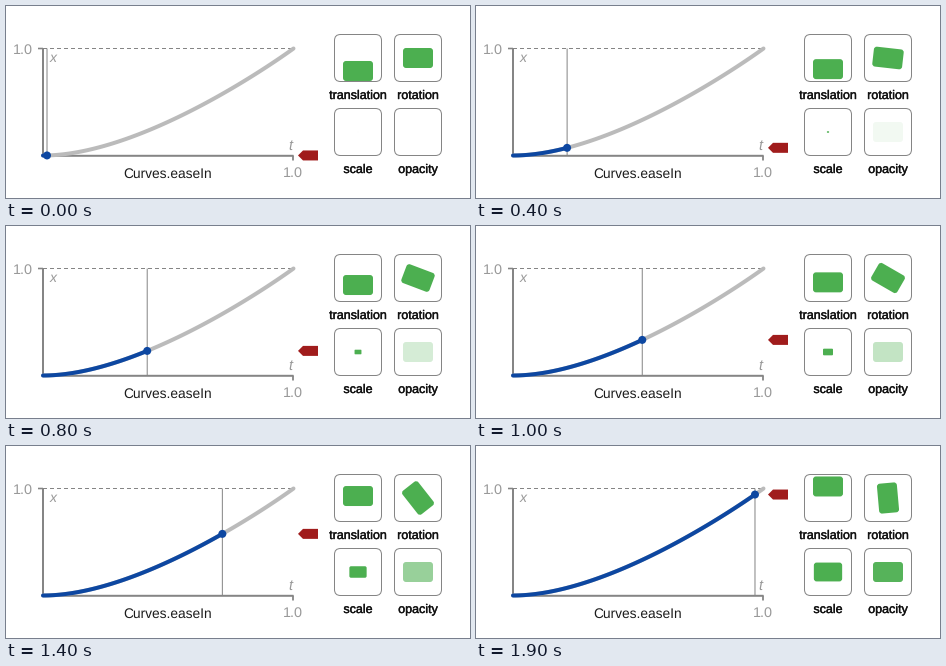
Recreate the animation shown at these times as a matplotlib script. Size 464 by 192 pixels, loop 2000 ms.

```python
import numpy as np
import matplotlib.pyplot as plt
from matplotlib.animation import FuncAnimation
from matplotlib.patches import Circle, FancyBboxPatch, Polygon
from matplotlib.patheffects import withStroke
from matplotlib.transforms import Affine2D

W, H, DPI = 464, 192, 64
PX = 72 / DPI  # points per pixel
FRAMES, INTERVAL = 20, 100

GREY, LABEL, TRACK = "#858585", "#999999", "#bbbbbb"
BLUE, GREEN, RED = "#0d47a1", "#4caf50", "#a01c1c"
X0, X1, Y0, Y1 = 37, 287.5, 149.5, 42.5

plt.rcParams["font.family"] = "Liberation Sans"
plt.rcParams["text.hinting"] = "none"

fig = plt.figure(figsize=(W / DPI, H / DPI), dpi=DPI, facecolor="white")
ax = fig.add_axes([0, 0, 1, 1])
ax.set_xlim(0, W)
ax.set_ylim(H, 0)
ax.axis("off")


def bezier(s):
    """Ease-in cubic with control points (0.42, 0) and (1, 1)."""
    y = 3 * (1 - s) * s**2 + s**3
    return 3 * 0.42 * (1 - s) ** 2 * s + y, y


def solve(t):
    lo, hi = 0.0, 1.0
    for _ in range(40):
        mid = (lo + hi) / 2
        if bezier(mid)[0] < t:
            lo = mid
        else:
            hi = mid
    return lo


def curve(end):
    x, y = bezier(np.linspace(0, end, 120))
    return X0 + (X1 - X0) * x, Y0 + (Y1 - Y0) * y


def line(x, y, color, width, **kw):
    kw.setdefault("solid_capstyle", "butt")
    return ax.plot(x, y, color=color, lw=width * PX, snap=False, **kw)[0]


def text(x, y, s, size, color, weight=0, **kw):
    label = ax.text(x, y, s, size=size * PX, color=color, ha="center",
                    va="baseline", **kw)
    if weight:
        label.set_path_effects(
            [withStroke(linewidth=weight * PX, foreground=color)])


def rounded(x, y, w, h, r, **kw):
    box = FancyBboxPatch((x, y), w, h, snap=False,
                         boxstyle=f"round,pad=0,rounding_size={r}", **kw)
    return ax.add_patch(box)


def block():
    return rounded(-15, -10, 30, 20, 3, fc=GREEN, ec="none", zorder=2)


def place(patch, x, y, angle=0, scale=1):
    move = Affine2D().scale(scale).rotate(angle).translate(x, y)
    patch.set_transform(move + ax.transData)


# Graph
line([X0, X1], [Y1, Y1], GREY, 1, dashes=(4, 3))
line([X0, X0], [Y1 - 0.5, Y0 + 1], GREY, 2)
line([X0 - 5, X0], [Y1, Y1], GREY, 1.6)
line([X0 - 1, X1], [Y0 + 0.3, Y0 + 0.3], GREY, 2)
line([X1 - 0.5] * 2, [Y0, Y0 + 5], GREY, 1.8)
line(*curve(1), TRACK, 4, solid_capstyle="round", zorder=3)
text(17, 48, "1.0", 14.4, LABEL)
text(287, 170.5, "1.0", 14.4, LABEL)
text(47, 55.5, "x", 14, LABEL, style="italic")
text(284.5, 144, "t", 14.5, LABEL, style="italic")
text(162, 172, "Curves.easeIn", 13.7, "#1c1c1c")

# Sample boxes
for x, y, name in [(352, 52, "translation"), (412, 52, "rotation"),
                   (352, 126, "scale"), (412, 126, "opacity")]:
    rounded(x - 23.5, y - 23.5, 47, 47, 6, fc="none", ec=GREY, lw=PX,
            zorder=3)
    text(x, y + 41, name, 12.5, "#111111", weight=0.4)

# Moving parts
guide = line([], [], GREY, 1, zorder=2)
trail = line([], [], BLUE, 4, solid_capstyle="round", zorder=4)
dot = ax.add_patch(Circle((0, 0), 4, fc=BLUE, ec="none", zorder=5))
marker = ax.add_patch(Polygon([(0, 0)] * 3, fc=RED, ec="none", snap=False))
slider, spinner, grower, fader = (block() for _ in range(4))


def draw(i):
    s = solve(0.016 + i / FRAMES)
    v = bezier(s)[1]
    xs, ys = curve(s)
    x, y = xs[-1], ys[-1]
    guide.set_data([x, x], [Y1, Y0])
    trail.set_data(xs, ys)
    dot.center = x, y
    marker.set_xy([(292, y), (297, y - 5), (312, y - 5),
                   (312, y + 5), (297, y + 5)])
    place(slider, 352, 65 - 26 * v)
    place(spinner, 412, 52, angle=v * np.pi / 2)
    place(grower, 352, 126, scale=max(v, 1e-3))
    place(fader, 412, 126)
    fader.set_alpha(v)
    return guide, trail, dot, marker, slider, spinner, grower, fader


anim = FuncAnimation(fig, draw, frames=FRAMES, interval=INTERVAL,
                     init_func=lambda: draw(0), repeat=True, repeat_delay=0)
plt.show()
```
